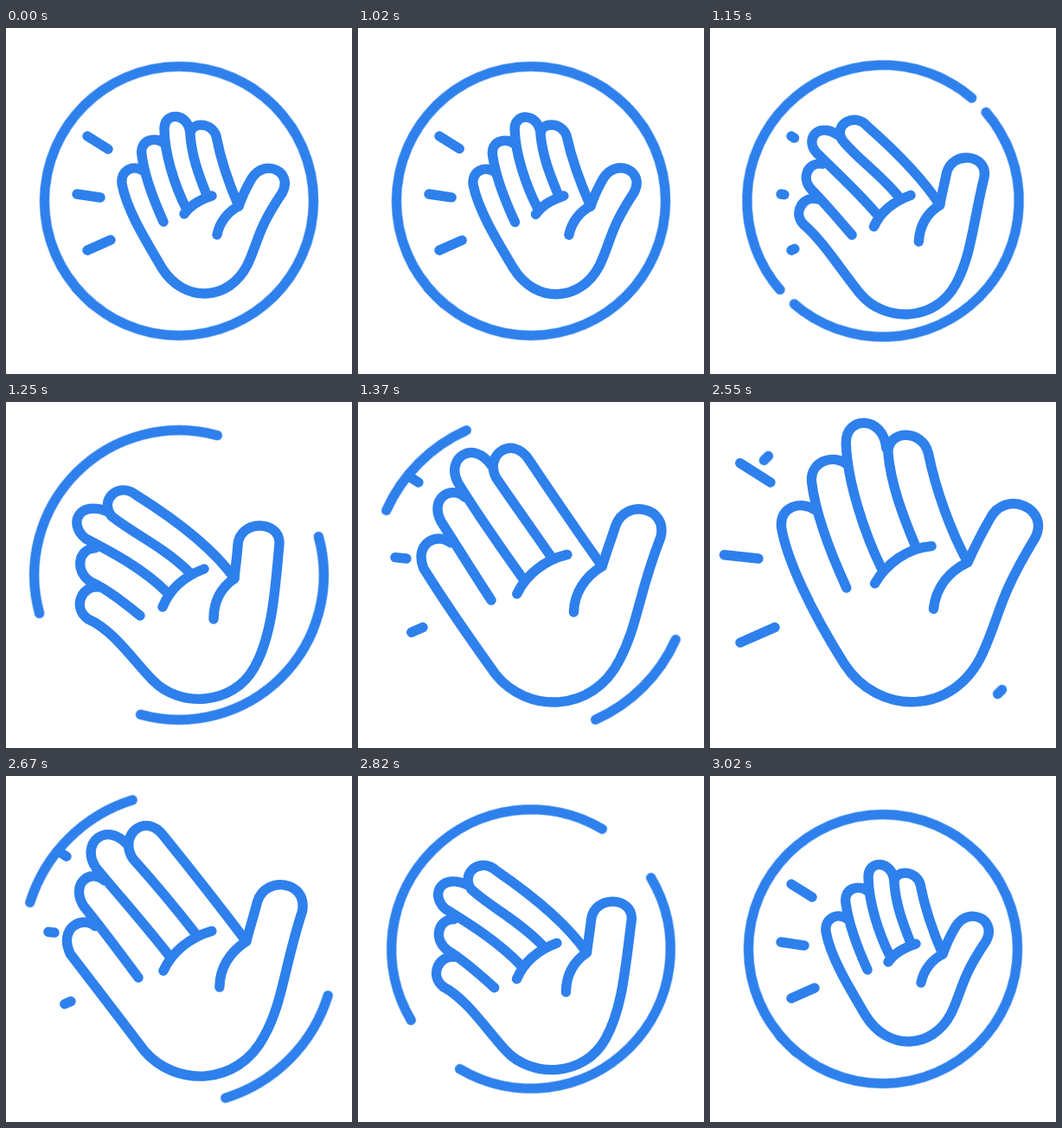
Recreate the animation shown at these times as an HTML page without scripts. Size 400 by 400 pixels, loop 3.05 s.

```html
<!DOCTYPE html>
<html lang="en">
<head>
<meta charset="utf-8">
<title>High five</title>
<style>
  html, body { margin: 0; width: 100%; height: 100%; overflow: hidden; background: #fff; }
  svg { display: block; width: 100%; height: 100%; }

  /* One pass goes small to large; alternating plays it back. */
  svg * {
    fill: none;
    stroke: #2e80ec;
    stroke-width: 11.4;
    stroke-linecap: round;
    stroke-linejoin: round;
    animation: 1525ms cubic-bezier(.333, 0, .667, 1) -2565ms infinite alternate;
  }

  .ring { animation-name: ring; }
  .near { animation-name: near; }
  .far { animation-name: far; }
  .body { animation-name: body; }
  .fingers { animation-name: fingers; }

  /* Circle splits into two arcs that shrink as they move out. */
  @keyframes ring {
    0%, 40.26% { r: 155.5px; stroke-dasharray: 180 0; stroke-dashoffset: 90; opacity: 1; }
    66.23% { r: 191.5px; stroke-dasharray: 0 180; stroke-dashoffset: 0; opacity: 1; }
    66.24%, 100% { r: 191.5px; stroke-dasharray: 0 180; stroke-dashoffset: 0; opacity: 0; }
  }

  @keyframes near {
    0%, 33.77% { stroke-dasharray: 1 2; opacity: 1; }
    46.75% { stroke-dasharray: 0 2; opacity: 1; }
    46.76%, 100% { stroke-dasharray: 0 2; opacity: 0; }
  }

  @keyframes far {
    0%, 53.24% { stroke-dasharray: 0 2; opacity: 0; }
    53.25% { stroke-dasharray: 0 2; opacity: 1; }
    66.23%, 100% { stroke-dasharray: 1 2; opacity: 1; }
  }

  /* Little finger, palm and thumb: small, bent, unbending, large. */
  @keyframes body {
    0%, 33.77% {
      d: path("M160 166 C148 157 132 164 134 180 C139 208 158 240 180 277 C205 318 257 317 279 274 C293 244 290 234 319 191 C333 166 299 150 284 174 C278 184 273 195 269 206 C257 212 247 224 244 239");
    }
    50% {
      d: path("M106 214 C88 212 76 238 95 251 C125 264 148 300 170 322 C200 353 262 352 287 307 C307 272 311 222 316 163 C316 136 270 136 268 165 C267 180 265 192 264 204 C248 215 240 231 240 251");
      animation-timing-function: cubic-bezier(.333, 0, .667, .463);
    }
    56.72% {
      d: path("M103 173 C88 160 60 175 74 205 C97 235 132 281 160 318 C195 359 268 360 299 300 C320 262 322 220 343 156 C349 120 300 115 291 145 C287 160 282 176 278 191 C259 203 247 222 247 244");
      animation-timing-function: cubic-bezier(.333, .457, .667, 1);
    }
    66.23%, 100% {
      d: path("M122 122 C107 112 81 117 83 142 C88 178 115 238 155 302 C193 362 282 365 316 290 C338 241 332 231 377 158 C397 123 343 99 325 135 C315 152 306 170 299 185 C278 195 262 213 259 239");
    }
  }

  /* Ring, middle and index fingers, then the crease. */
  @keyframes fingers {
    0%, 33.77% {
      d: path("M182 224 C168 193 160 170 157 147 C154 130 172 124 184 134 M208 208 C195 182 183 145 183 116 C183 97 211 97 213 122 M232 193 C222 168 215 148 213 124 C212 108 238 108 243 125 C248 151 259 183 269 206 M206 215 C210 209 220 200 238 194");
    }
    50% {
      d: path("M155 247 C135 231 116 216 98 208 C79 196 83 170 103 169 M187 221 C159 193 123 174 92 158 C71 141 84 113 118 127 M211 196 C183 168 145 151 122 132 C107 113 131 91 151 108 C194 135 238 167 264 204 M181 237 C188 220 202 203 229 193");
      animation-timing-function: cubic-bezier(.333, 0, .667, .463);
    }
    56.72% {
      d: path("M153 233 C131 203 111 176 90 150 C74 125 96 105 114 120 M189 208 C161 172 131 138 104 105 C86 78 115 50 141 79 M220 183 C196 152 171 122 147 95 C130 68 161 40 183 69 C215 109 247 150 278 191 M182 225 C192 203 213 186 238 179");
      animation-timing-function: cubic-bezier(.333, .457, .667, 1);
    }
    66.23%, 100% {
      d: path("M158 214 C137 167 122 122 119 90 C117 66 145 56 162 71 M199 192 C180 152 160 90 160 45 C160 12 205 14 207 52 M239 167 C224 130 211 93 209 58 C208 30 250 30 256 59 C263 100 280 150 299 185 M191 209 C204 187 228 168 257 166");
    }
  }
</style>
</head>
<body>
<svg viewBox="0 0 400 400">
  <circle class="ring" cx="200" cy="200" r="155.5" pathLength="360" transform="rotate(45 200 200)"/>
  <path class="near" pathLength="1" d="M94 125 L118 140"/>
  <path class="near" pathLength="1" d="M82 192 L109 196"/>
  <path class="near" pathLength="1" d="M94 257 L121 245"/>
  <path class="far" pathLength="1" d="M70 93 L33 69.5"/>
  <path class="far" pathLength="1" d="M56 181 L14.5 176.5"/>
  <path class="far" pathLength="1" d="M75 260.5 L33 279"/>
  <path class="body"/>
  <path class="fingers"/>
</svg>
</body>
</html>
```
